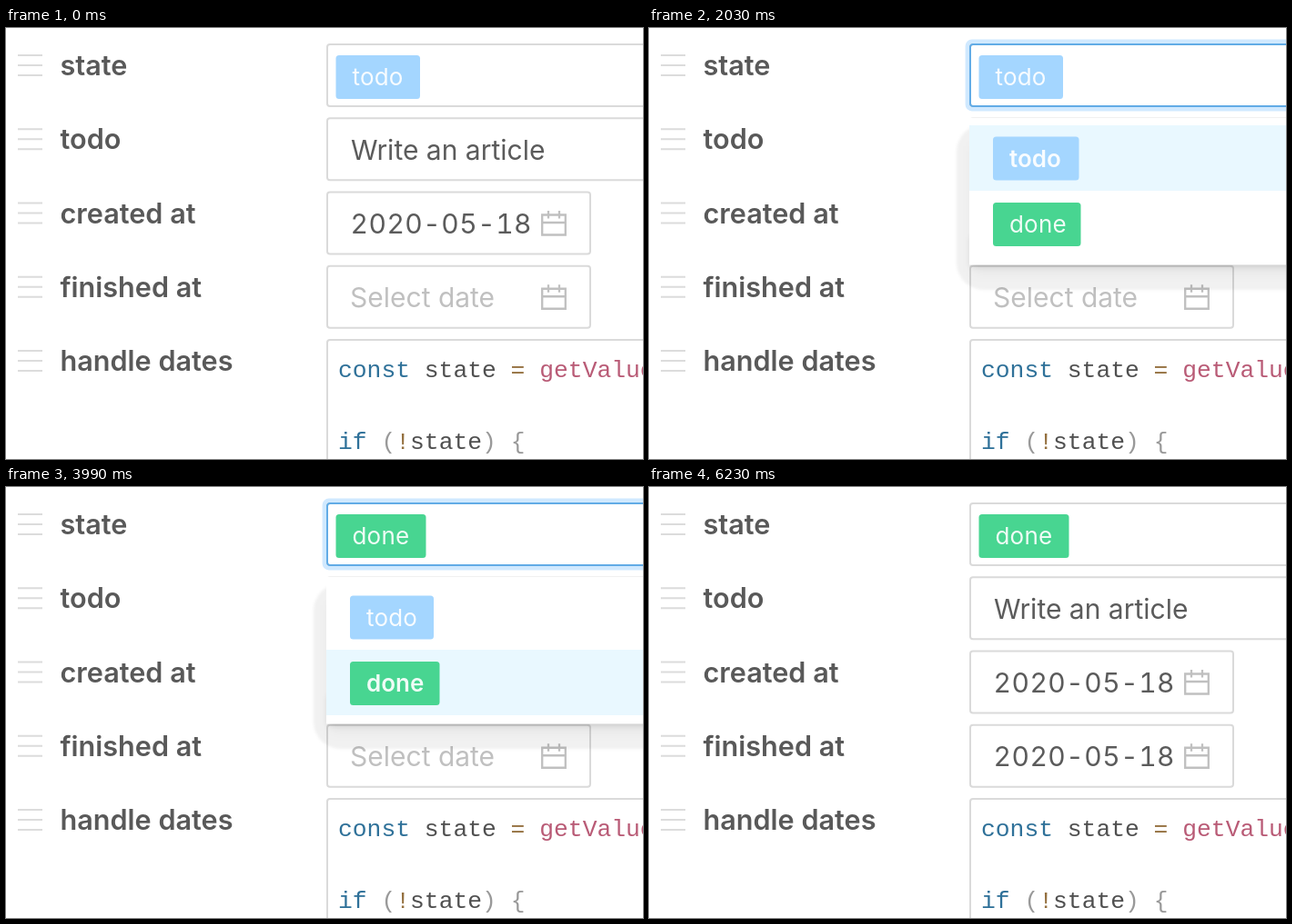
An HTML page that plays this animation: 700x474 px, repeating every 6300 ms.

```html
<!DOCTYPE html>
<html lang="en">
<head>
<meta charset="utf-8">
<title>Form with a state field</title>
<style>
  html, body { margin: 0; width: 100%; height: 100%; overflow: hidden; background: #fff; }
  svg { display: block; width: 100vw; height: 100vh; }
  text { white-space: pre; }
  .label { font: 600 30.6px Inter, sans-serif; fill: #595959; }
  .value { font: 400 30px Inter, sans-serif; fill: #5b5b5b; }
  .date { font-variant-numeric: tabular-nums; letter-spacing: .5px; }
  .hint { fill: #c0c0c0; }
  .tag { font: 400 26px Inter, sans-serif; letter-spacing: .2px; fill: #fff; fill-opacity: .92; }
  .bold { font-weight: 600; letter-spacing: 0; }
  .code { font: 400 26.33px "Liberation Mono", "Courier New", monospace; fill: #505050; }
  .key { fill: #2f7199; }
  .op { fill: #94703f; }
  .fn { fill: #b95b76; }
  .punct { fill: #999; }
  .box { fill: #fff; stroke: #dadada; stroke-width: 2; }
  .grip { stroke: #dcdcdc; stroke-width: 2; fill: none; }
  .cal { stroke: #c0c0c0; stroke-width: 2.3; fill: none; }
</style>
</head>
<body>
<svg id="stage" viewBox="0 0 700 474" preserveAspectRatio="none"></svg>
<script>
const LOOP = 6300, STEP = 70, ROW = 81.25;
const FOCUS = 210, OPEN = 1705, HOVER = 3400, PICK = 3850, CLOSE = 4080, FILL = 4200, BLUR = 4660;
const BLINK = 525, FIRST_BLINK = 700;
const PANEL = { x: 352, top: 98.5, bottom: 260.5 };
const TODO = '#a4d6ff', DONE = '#48d591';

const rowY = (i, y) => y + i * ROW;
const text = (x, y, cls, str, id = '') =>
  `<text id="${id}" class="${cls}" x="${x}" y="${y}">${str}</text>`;
const box = (i, w, h = 68) =>
  `<rect class="box" x="353" y="${rowY(i, 18)}" width="${w}" height="${h}" rx="3"/>`;
const grip = i => `<path class="grip" d="M13 ${rowY(i, 30)}h27m-27 11h27m-27 11h27"/>`;
const calendar = i =>
  `<path class="cal" transform="translate(588 ${rowY(i, 38)})"
    d="M1.2 5h25.6v22h-25.6zM1.2 13.5h25.6M8 .5v8.5M20 .5v8.5"/>`;
const tag = (id, x, y, w, color, str, bold = '') =>
  `<g id="${id}"><rect x="${x}" y="${y}" width="${w}" height="48" rx="3.5" fill="${color}"/>
   ${text(x + 18, y + 33.2, 'tag ' + bold, str)}</g>`;

const labels = ['state', 'todo', 'created at', 'finished at', 'handle dates'];
const stage = document.getElementById('stage');

stage.innerHTML = `
  <defs>
    <filter id="soft" x="-20%" y="-20%" width="140%" height="140%"><feGaussianBlur stdDeviation="1.5"/></filter>
    <filter id="wide" x="-20%" y="-20%" width="140%" height="140%"><feGaussianBlur stdDeviation="7"/></filter>
    <filter id="tight" x="-20%" y="-60%" width="140%" height="220%"><feGaussianBlur stdDeviation="3"/></filter>
  </defs>
  <rect width="700" height="474" fill="#fff"/>
  ${labels.map((s, i) => grip(i) + text(59.5, rowY(i, 52), 'label', s)).join('')}

  <rect id="ring" x="349.8" y="14.8" width="400" height="74.4" rx="5"
        fill="none" stroke="#1890ff" stroke-opacity=".2" stroke-width="4.4"/>
  ${box(0, 400)}
  <rect id="edge" x="353" y="18" width="400" height="68" rx="3" fill="none" stroke="#62ace6" stroke-width="2"/>
  ${tag('headTodo', 362.5, 30, 92.5, TODO, 'todo')}
  ${tag('headDone', 362.5, 30, 99, DONE, 'done')}
  <rect id="caret" x="476.5" y="34" width="2" height="38" fill="#595959"/>

  ${box(1, 400)}${text(379, 144.5, 'value', 'Write an article')}
  ${box(2, 289)}${text(378.5, 226, 'value date', '2020-05-18')}${calendar(2)}
  ${box(3, 289)}${text(378, 307, 'value hint', 'Select date', 'empty')}
  ${text(378.5, 307, 'value date', '2020-05-18', 'filled')}${calendar(3)}
  ${box(4, 400, 200)}
  ${text(365, 384, 'code', '<tspan class="key">const</tspan> state <tspan class="op">=</tspan> <tspan class="fn">getValue</tspan>')}
  ${text(365, 463, 'code', '<tspan class="key">if</tspan> <tspan class="punct">(</tspan><tspan class="op">!</tspan>state<tspan class="punct">)</tspan> <tspan class="punct">{</tspan>')}

  <g id="panel">
    <rect id="halo" width="420" rx="30" fill="#000" fill-opacity=".055" filter="url(#soft)"/>
    <rect x="356" y="130" width="420" height="138" fill="#000" fill-opacity=".05" filter="url(#wide)"/>
    <rect x="354" y="230" width="420" height="32" fill="#000" fill-opacity=".14" filter="url(#tight)"/>
    <rect x="${PANEL.x}" y="${PANEL.top}" width="400" height="${PANEL.bottom - PANEL.top}" fill="#fff"/>
    <rect id="hotTodo" x="${PANEL.x}" y="107" width="400" height="72" fill="#e9f8ff"/>
    <rect id="hotDone" x="${PANEL.x}" y="179" width="400" height="72" fill="#e9f8ff"/>
    ${tag('todoBold', 378, 119.5, 94.5, TODO, 'todo', 'bold')}
    ${tag('todoPlain', 378, 119.5, 92, TODO, 'todo')}
    ${tag('donePlain', 378, 192, 96.5, DONE, 'done')}
    ${tag('doneBold', 378, 192, 98.5, DONE, 'done', 'bold')}
  </g>`;

const el = {};
stage.querySelectorAll('[id]').forEach(n => { if (n.id) el[n.id] = n; });

const clamp = v => Math.min(1, Math.max(0, v));
const part = (t, start, length) => clamp((t - start) / length);
const smooth = u => u * u * (3 - 2 * u);
const fade = (node, v) => node.setAttribute('opacity', v);
const show = (node, on) => node.setAttribute('visibility', on ? 'visible' : 'hidden');

function openness(t) {
  if (t < OPEN) return 0;
  if (t < CLOSE) return 1 - (1 - part(t, OPEN, 200)) ** 5;
  return 1 - part(t, CLOSE, 200) ** 5;
}

function caretOn(t) {
  if (t < FOCUS + STEP || t >= PICK) return false;
  return Math.floor((t - FIRST_BLINK) / BLINK) % 2 !== 0;
}

function draw(t) {
  const focus = smooth(part(t, FOCUS, 210)) - smooth(part(t, BLUR, 300));
  fade(el.ring, focus);
  fade(el.edge, focus);
  show(el.caret, caretOn(t));

  const picked = t >= PICK;
  show(el.headTodo, !picked);
  show(el.headDone, picked);
  show(el.todoBold, !picked);
  show(el.todoPlain, picked);
  show(el.donePlain, !picked);
  show(el.doneBold, picked);

  const hover = smooth(part(t, HOVER, 280));
  fade(el.hotTodo, 1 - hover);
  fade(el.hotDone, hover);

  show(el.empty, t < FILL);
  show(el.filled, t >= FILL);

  // The panel unfolds downward from its top edge.
  const p = openness(t), scale = 0.8 + 0.2 * p, inset = (1 - p) * 26;
  fade(el.panel, p);
  el.panel.setAttribute('transform',
    `translate(0 ${PANEL.top * (1 - scale)}) scale(1 ${scale})`);
  el.halo.setAttribute('x', 338 + inset);
  el.halo.setAttribute('y', 106 + inset);
  el.halo.setAttribute('height', 182 - 2 * inset);
}

const begin = performance.now();
function tick() {
  const t = (performance.now() - begin) % LOOP;
  draw(Math.floor(t / STEP) * STEP);
  requestAnimationFrame(tick);
}
draw(0);
requestAnimationFrame(tick);
</script>
</body>
</html>
```
